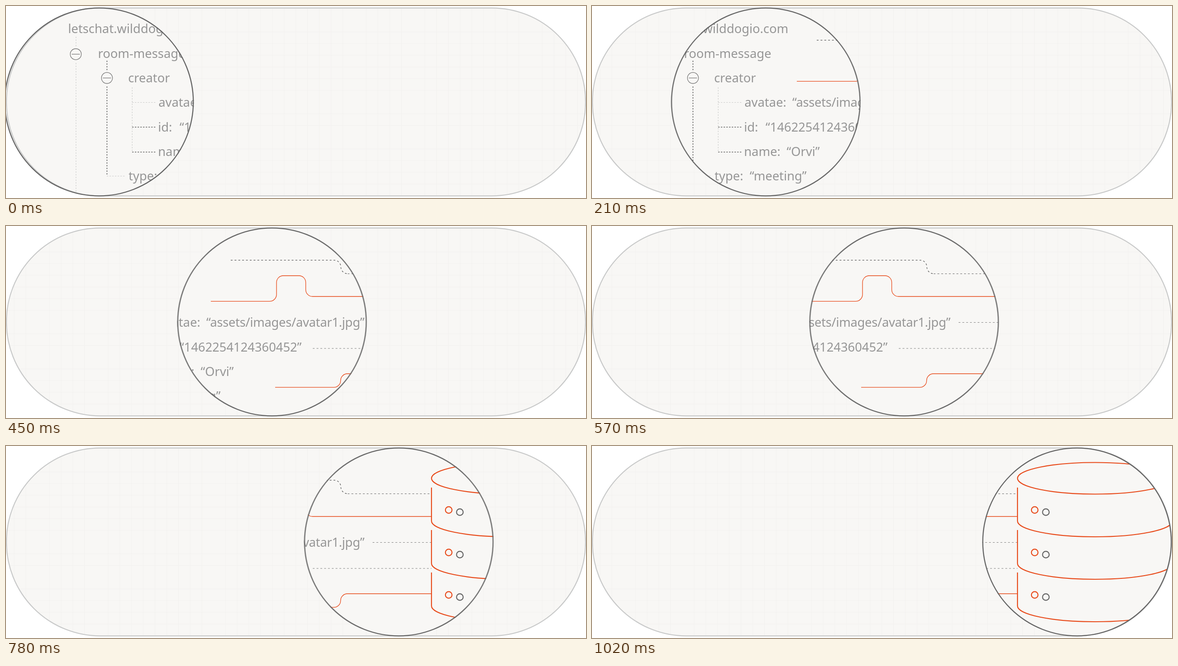
Write an HTML page that moves like this. It is 1280 px wide and 425 px high and loops after 1050 ms.

```html
<!DOCTYPE html>
<html lang="en">
<head>
<meta charset="utf-8">
<title>Data lens</title>
<style>
  html, body { margin: 0; width: 100%; height: 100%; overflow: hidden; background: #fff; }
  svg { position: absolute; left: 0; top: 0; width: 1280px; height: 425px; fill: none; }

  /* 35 hard steps of 25.44px each */
  .lens { animation: lens 1050ms steps(35) infinite; }
  .ring { animation: ring 1050ms steps(35) infinite; }
  @keyframes lens {
    from { clip-path: circle(209.3px at 205.4px 212.3px); }
    to   { clip-path: circle(209.3px at 1095.8px 212.3px); }
  }
  @keyframes ring {
    from { transform: translateX(0); }
    to   { transform: translateX(890.4px); }
  }

  .paper { fill: #f8f7f5; }
  .grid { stroke: #f2f1ef; }
  .text { font: 27.3px "Noto Sans", "Open Sans", sans-serif; fill: #969696; }
  .tight { letter-spacing: -.27px; }
  .tree { stroke-dasharray: 3 3; }
  .pale { stroke: #c4c4c4; }
  .dark { stroke: #3a3a3a; stroke-width: 1.25; }
  .node { stroke: #777; stroke-width: 1.3; }
  .wire { stroke: #e84a1a; stroke-width: 1.3; }
  .dash { stroke: #555; stroke-width: 1.25; stroke-dasharray: 4 4.4; }
  .thin { stroke: #7d7d7d; stroke-width: 1.1; }
  .disk { stroke: #e84a1a; stroke-width: 2.2; }
  .lamp { stroke: #646464; stroke-width: 2.2; }
</style>
</head>
<body>
<svg viewBox="0 0 1280 425">
  <defs>
    <rect id="pill" x="1" y="4.3" width="1278" height="416" rx="207"/>
    <clipPath id="inside"><use href="#pill"/></clipPath>
  </defs>
  <use href="#pill" class="paper"/>
  <path id="grid" class="grid" clip-path="url(#inside)"/>
</svg>

<svg class="lens" viewBox="0 0 1280 425">
  <defs>
    <g id="minus"><circle r="12.2"/><path d="M-9 0H9"/></g>
    <g id="unit">
      <path class="disk" d="M939 92V166A171 35 0 0 0 1281 166V92"/>
      <circle class="disk" cx="977" cy="141.6" r="7.3"/>
      <circle class="lamp" cx="1001.6" cy="146.4" r="7.3"/>
    </g>
  </defs>
  <rect class="paper" width="1280" height="425"/>

  <g class="text">
    <text x="137" y="60">letschat.wilddogio.com</text>
    <text x="203" y="114.5">room-message</text>
    <text x="269.5" y="169">creator</text>
    <text x="336.5" y="223">avatae:</text>
    <text class="tight" x="442" y="223">“assets/images/avatar1.jpg”</text>
    <text x="335.5" y="277.5">id:</text>
    <text x="383" y="277.5">“1462254124360452”</text>
    <text x="335.5" y="331.5">name:</text>
    <text x="429.5" y="331.5">“Orvi”</text>
    <text x="270.5" y="386">type:</text>
    <text x="348" y="386">“meeting”</text>
  </g>

  <path class="tree pale" d="M154.5 68V90M154.5 126V425M222.5 376.5H263M278.5 180V323M278.5 213.5H330"/>
  <path class="tree dark" d="M222.8 121V144M222.8 178V376M278.5 268H330M278.5 323.3H330"/>
  <use href="#minus" class="node" x="154" y="106.7"/>
  <use href="#minus" class="node" x="222.8" y="159.3"/>

  <path class="dash" d="M496 75.6H724A15 15 0 0 1 739 90.6A15 15 0 0 0 754 105.6"/>
  <path class="dash thin" d="M754 105.6H939M809 213.5H939M677 271H939"/>
  <path class="wire" d="M452 166.6H582A15 15 0 0 0 597 151.6V125A15 15 0 0 1 612 110H646.500A15 15 0 0 1 661.5 125V141A15 15 0 0 0 676.5 156H939"/>
  <path class="wire" d="M594 357.2H723.5A15 15 0 0 0 738.5 342.2A15 15 0 0 1 753.5 327H939"/>

  <ellipse class="disk" cx="1110" cy="71.5" rx="171" ry="35"/>
  <use href="#unit"/>
  <use href="#unit" y="94"/>
  <use href="#unit" y="188"/>
</svg>

<svg viewBox="0 0 1280 425">
  <use href="#pill" stroke="#c8c9c9" stroke-width="2.2"/>
  <circle class="ring" cx="205.4" cy="212.3" r="208" stroke="#646464" stroke-width="2.3"/>
</svg>

<script>
  // Grid lines every 25.9px, with a few gaps in the pattern
  const lines = (count, gaps, draw) =>
    Array.from({ length: count }, (_, i) => gaps.includes(i) ? "" : draw(i * 25.9)).join("");
  document.getElementById("grid").setAttribute("d",
    lines(49, [2, 7, 17, 29, 34, 44], d => `M${18 + d} 4V421`) +
    lines(16, [1, 8, 11], d => `M0 ${5.5 + d}H1280`));
</script>
</body>
</html>
```
